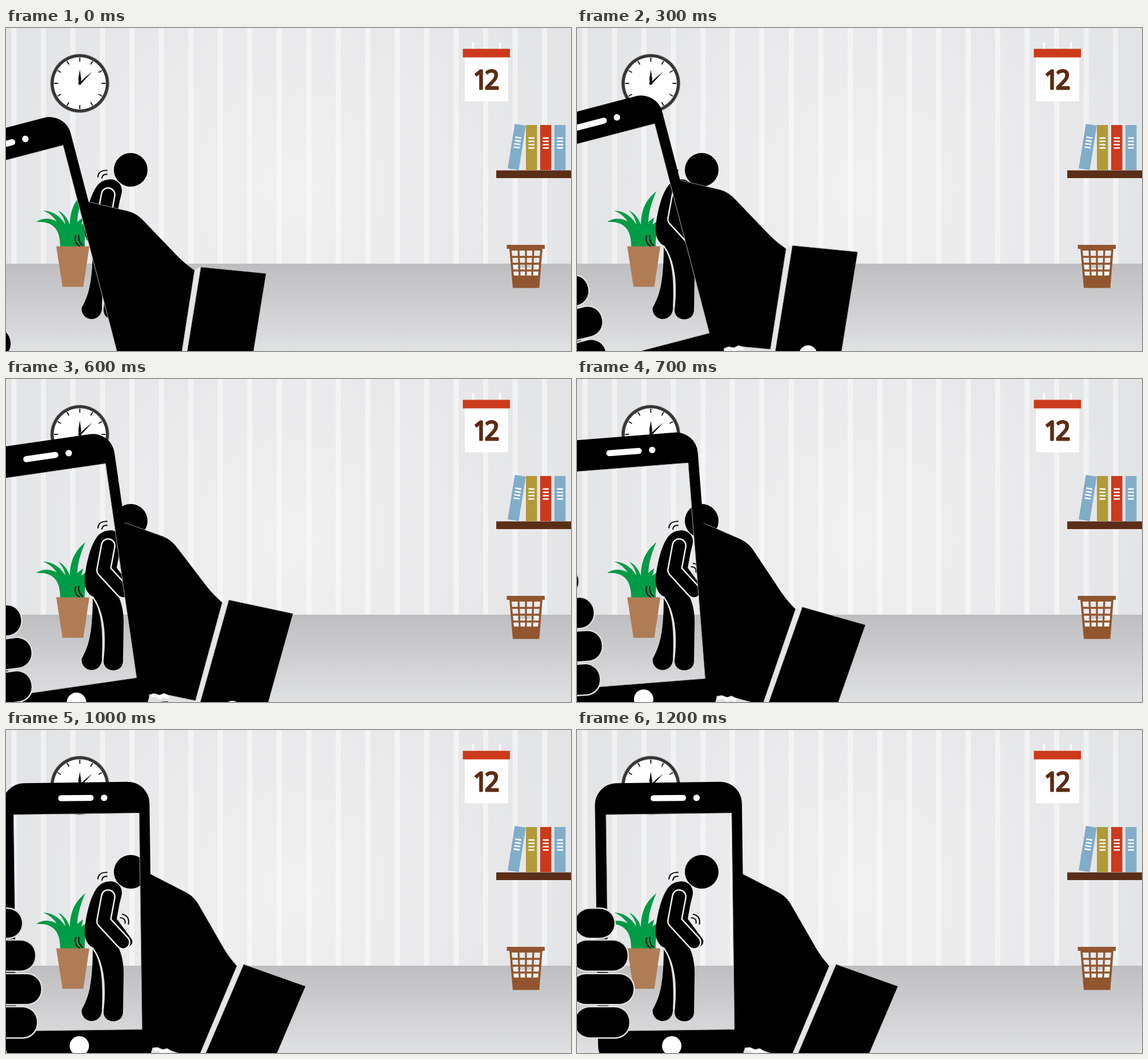
These frames come from a looping animation (990 by 566 pixels, 1.3 s). An HTML page:

```html
<!DOCTYPE html>
<html lang="en">
<head>
<meta charset="utf-8">
<title>Phone in hand</title>
<style>
  html, body { margin: 0; width: 100%; height: 100%; overflow: hidden; }
  svg { display: block; width: 100vw; height: 100vh; }
  text { font: 400 45px "Open Sans", "Noto Sans", sans-serif; letter-spacing: -5.3px; }
</style>
</head>
<body>
<svg viewBox="0 0 990 566">
  <defs>
    <radialGradient id="wall" gradientUnits="userSpaceOnUse" cx="495" cy="280" r="520">
      <stop offset="0" stop-color="#f1f1f2"/>
      <stop offset="1" stop-color="#e3e4e6"/>
    </radialGradient>
    <linearGradient id="floor" x2="0" y2="1">
      <stop offset="0" stop-color="#bebec0"/>
      <stop offset="1" stop-color="#e0e1e2"/>
    </linearGradient>
  </defs>

  <rect width="990" height="414" fill="url(#wall)"/>
  <g id="stripes" fill="#fff" opacity=".5"></g>
  <rect y="413" width="990" height="153" fill="url(#floor)"/>

  <g id="clock" transform="translate(129.3 97)">
    <circle r="52" fill="#b5b5b6"/>
    <circle r="51" fill="#373536"/>
    <circle r="45.7" fill="#fff"/>
    <g id="ticks" stroke="#222" stroke-width="2"></g>
    <path d="M0-24 L2.6-8 L1.5 2 H-1.5 L-2.6-8Z M22-20.5 L1.5 1.5 L-.8-.8 L10-11Z" fill="#151515"/>
    <circle r="2.8" fill="#151515"/>
  </g>

  <g id="calendar">
    <path d="M818.5 25V38 M865.5 25V38" stroke="#fff" stroke-width="3.4"/>
    <rect x="804" y="50" width="76" height="78.5" fill="#fff"/>
    <rect x="800.5" y="36.5" width="82.5" height="15" fill="#cc3a1c"/>
    <text x="818.4" y="106.5" fill="#5d2c13" stroke="#5d2c13" stroke-width="3" stroke-linejoin="round">12</text>
  </g>

  <g id="shelf">
    <rect x="859" y="249.5" width="131" height="13.5" fill="#5b2e18"/>
    <g id="books"></g>
  </g>

  <g id="bin">
    <path d="M882 386H940L934.5 455.5H888Z" fill="#91562f"/>
    <path d="M886 390H936L932 433.5H890Z" fill="#ebebec"/>
    <path d="M889 416H934L932 433.5H890Z" fill="#fbfbfb"/>
    <path d="M894 420Q902 412 911 416Q920 412 928 420Z" fill="#c7cbcb"/>
    <path d="M898 388L900 434 M911 388V434 M924 388L922 434 M885 401H938 M885 413H937 M886 425H937"
          stroke="#91562f" stroke-width="3.3"/>
    <rect x="877.5" y="380" width="66.5" height="7" fill="#91562f"/>
  </g>

  <g id="plant">
    <path fill="#009b45" d="M95 383C95 357 86 338 53 340C63 332 79 333 89 339C83 331 76 324 65 320
      C80 320 94 328 104 344C102 333 98 327 91 320C101 324 108 334 112 345C112 317 122 300 139 286
      C130 306 125 326 125 340C128 337 131 335 135 332C134 338 133 341 132 345C140 337 150 334 161 338C143 343 137 358 138 383Z"/>
    <path d="M88 382.5H146L135.5 453.5H99Z" fill="#b07c55"/>
  </g>

  <g id="person" stroke-linecap="round" stroke-linejoin="round" fill="none">
    <path fill="#000" d="M180 265.5C193 264 204 273 203 287C200 305 192 320 190 335L192 372C202 387 207 408 206 432L205 494
      C205 516 171 516 171 494C175 458 176 414 153 382C168 412 170 442 168 492C166 517 132 515 132.5 491
      C142 472 152 456 152 381C142 376 137 365 138 349C140 325 147 297 156 282C162 271 171 266 180 265.5Z"/>
    <path d="M152 382C171 409 173 444 169.5 488" stroke="#e8e8e9" stroke-width="2.4"/>
    <path d="M191 300L185 333L213 371" stroke="#000" stroke-width="17"/>
    <path d="M179 292L171 335L205 372" stroke="#f0f0f0" stroke-width="26"/>
    <path d="M179 292L171 335L205 372" stroke="#000" stroke-width="21"/>
    <circle cx="218.5" cy="248.5" r="29.5" fill="#000"/>
    <path stroke="#151515" stroke-width="2.2" d="M161 261Q162 249 177 249.5 M168 263Q169 256 177 256.5
      M204 323Q217 326 214.5 340 M200.5 329Q210 330 208.5 338.5 M122 364Q119 377 129 382 M127.5 363Q126 374 134 381"/>
  </g>

  <g id="phone">
    <path d="M296 553L330 562L326 569L318 565L312 568L304 562L297 563Z" fill="#fff" opacity=".85"/>
    <path d="M313 572L325 573L324 585Z"/>
    <path d="M442 413L454 410L358 634L349 634Z" fill="#e6e6e7"/>
    <path d="M454 410.5L562.5 449L463 682L338 682Z" stroke="#b9b9ba" stroke-width=".8"/>
    <path d="M276 252H290L354 285Q369 293 378 311L420 384Q429 399 442 413.5L373 578L327 562L320 558L312 560L303 556L294 557L276 540Z"
          stroke="#a9a9aa" stroke-width=".8"/>
    <g transform="rotate(-.75 160 119)">
      <path fill-rule="evenodd" d="M69.3 92H250.8A38 38 0 0 1 288.8 130V552A38 38 0 0 1 250.8 590H69.3
        A38 38 0 0 1 31.3 552V130A38 38 0 0 1 69.3 92Z M50.5 147V526H270.5V147Z"/>
      <rect x="50.5" y="147" width="220" height="379" fill="none" stroke="#b4b4b5" stroke-width=".9"/>
      <rect x="129" y="114" width="62" height="10.5" rx="5" fill="#fff"/>
      <circle cx="209.5" cy="119.5" r="5.7" fill="#fff"/>
    </g>
    <circle cx="166" cy="553.5" r="17" fill="#fff"/>
    <circle cx="435" cy="602" r="15.5" fill="#fff"/>
    <g id="fingers" stroke="#dedede" stroke-width="5" paint-order="stroke"></g>
  </g>
</svg>
<script>
const byId = id => document.getElementById(id);
const repeat = (count, draw) => Array.from({ length: count }, (_, i) => draw(i)).join("");

byId("stripes").innerHTML = repeat(19, i =>
  `<rect x="${9.5 + i * 51.65}" width="9" height="413"/>`);

byId("ticks").innerHTML = repeat(12, i =>
  `<path d="M0-45V-38" transform="rotate(${i * 30})"/>`);

const book = (color, placement) => `<g transform="${placement}">
  <rect width="19.5" height="79" fill="${color}"/>
  ${repeat(4, i => `<rect x="4.5" y="${21.5 + i * 5.8}" width="10.5" height="2.6" fill="#fff"/>`)}</g>`;
byId("books").innerHTML =
  book("#81adc9", "translate(891.5 168) rotate(9)") +
  book("#b29a39", "translate(911 170)") +
  book("#cc391b", "translate(936 170)") +
  book("#81adc9", "translate(961 170)");

const fingers = [[-3, 65.5, 313.5, 50.5], [-8, 88.5, 369, 52.5], [-10, 99, 428, 52], [-3, 91.5, 486, 52.5]];
byId("fingers").innerHTML = fingers.map(([left, right, top, height]) =>
  `<rect x="${left}" y="${top}" width="${right - left}" height="${height}" rx="25"/>`).join("");

// Position of the phone camera and tilt of the hand, one pose every 200 ms.
const poses = [
  [34, 194.5, -13.9], [56, 170.5, -13.9], [84, 143, -13.9], [110, 130, -7.5],
  [153.5, 119, 0], [172, 119, 0], [209.5, 119, 0]
];
const LOOP = 1300, STEP = 100;
const phone = byId("phone");

function render(time) {
  const step = Math.floor((time % LOOP) / STEP);
  const from = poses[Math.floor(step / 2)];
  const to = poses[Math.ceil(step / 2)];
  const [x, y, tilt] = from.map((value, i) => (value + to[i]) / 2);
  phone.setAttribute("transform", `translate(${x} ${y}) rotate(${tilt}) translate(-209.5 -119)`);
}

const start = performance.now();
function tick() {
  render(performance.now() - start);
  requestAnimationFrame(tick);
}
tick();
</script>
</body>
</html>
```
